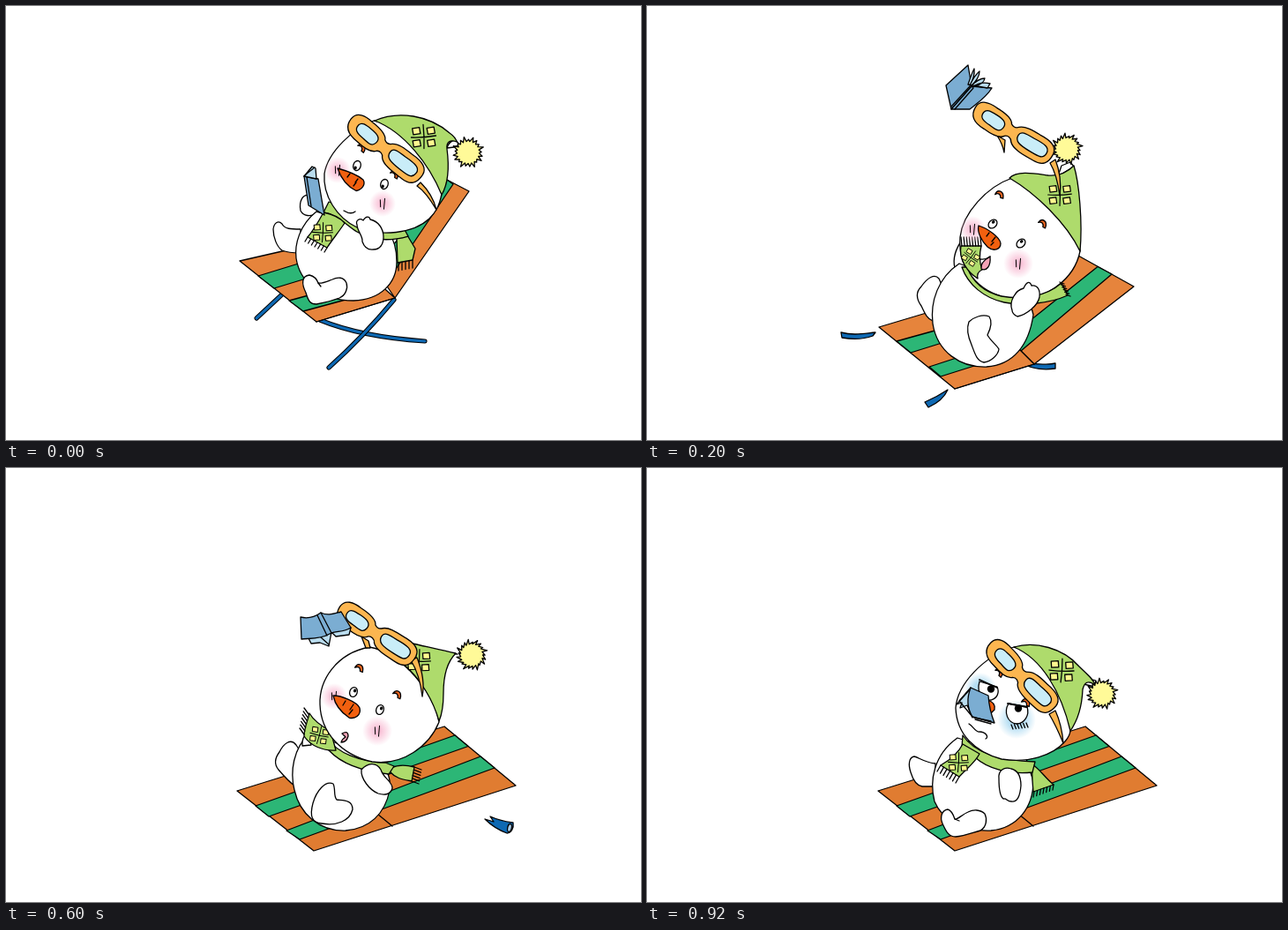
These frames come from a looping animation (720x492 px, 1 s). An HTML page:

```html
<!DOCTYPE html>
<html lang="en">
<head>
<meta charset="utf-8">
<title>Snowman on a deck chair</title>
<style>
html, body { margin: 0; width: 100%; height: 100%; overflow: hidden; background: #fff; }
svg { display: block; width: 100vw; height: 100vh; }
svg > g { opacity: 0; }
</style>
</head>
<body>
<svg id="stage" viewBox="0 0 720 492" fill="none" stroke="#000" stroke-width="1.3" stroke-linejoin="round" stroke-linecap="round">
<defs>
<radialGradient id="pink"><stop offset=".15" stop-color="#f8bdd4"/><stop offset="1" stop-color="#f8bdd4" stop-opacity="0"/></radialGradient>
<radialGradient id="chill"><stop offset=".4" stop-color="#b5def3"/><stop offset="1" stop-color="#b5def3" stop-opacity="0"/></radialGradient>
</defs>
</svg>
<script>
const C = {
  snow: '#fff', wool: '#aedb6c', orange: '#e6843c', mat: '#e07c31', green: '#2cb676',
  steel: '#0e69b3', tip: '#a9cdea', book: '#7badd2', page: '#b9dcee', frame: '#fcb650',
  lens: '#c9edf8', carrot: '#f2600f', brow: '#e8641e', puff: '#fffa98', patch: '#fff98f', tongue: '#f3a3b6'
};

const P = (d, fill = 'none', extra = '') => `<path d="${d}" fill="${fill}" ${extra}/>`;
const snow = (...ds) => ds.map(d => P(d, C.snow)).join('');
const wool = (...ds) => ds.map(d => P(d, C.wool)).join('');
const at = (x, y, turn, inner, size = 1) =>
  `<g transform="translate(${x} ${y}) rotate(${turn}) scale(${size})">${inner}</g>`;
const glow = (x, y, r, id) => `<circle cx="${x}" cy="${y}" r="${r}" fill="url(#${id})" stroke="none"/>`;

function puff(x, y, turn, lean = 0) {
  const n = 21;
  let d = '';
  for (let i = 0; i < n; i++) {
    const a = i / n * 2 * Math.PI, b = (i + .5) / n * 2 * Math.PI;
    const r = 16.5 + 1.8 * Math.sin(i * 2.4);
    d += `${i ? 'L' : 'M'}${12.5 * Math.cos(a)},${12.5 * Math.sin(a)}L${r * Math.cos(b + lean)},${r * Math.sin(b + lean)}`;
  }
  return at(x, y, turn, P(d + 'Z', C.puff));
}

function plaid(x, y, turn = 0, size = 1) {
  const square = (a, b) => P(`M${a},${b}l8,-1l1,7l-8,1Z`, C.patch);
  return at(x, y, turn, P('M-14,0Q0,1 14,-1M0,-14Q1,0 0,13') +
    square(-12.5, -10) + square(4, -10) + square(-12.5, 4) + square(4, 4), size);
}

// Tassel threads between two points, all leaning by (dx, dy).
function fringe(x0, y0, x1, y1, dx, dy, n = 7) {
  let d = '';
  for (let i = 0; i < n; i++) {
    const k = i / (n - 1);
    d += `M${x0 + (x1 - x0) * k},${y0 + (y1 - y0) * k}l${dx},${dy}`;
  }
  return P(d);
}

const goggles = (x, y, turn) => at(x, y, turn,
  P('M-51,-4C-51,-15 -40,-17 -30,-16C-20,-16 -9,-15 -6,-9C-3,-7 0,-7 3,-10C8,-15 18,-15 28,-15C42,-16 51,-13 52,-4C53,8 48,14 36,14C24,14 10,15 4,9C2,5 -3,4 -6,7C-10,13 -20,13 -30,12C-42,12 -51,8 -51,-4Z', C.frame) +
  P('M-40,-4C-39,-9 -34,-9 -26,-9C-15,-9 -11,-6 -12,0C-13,6 -17,6 -26,5C-36,5 -41,3 -40,-4Z', C.lens) +
  P('M7,-2C7,-8 13,-8 24,-8C38,-9 45,-8 45,-1C45,7 40,7 28,7C14,7 7,6 7,-2Z', C.lens));

const eye = (x, y, turn, px = 0, py = 3) => at(x, y, turn,
  `<ellipse rx="4.2" ry="5.6" fill="#fff"/><ellipse cx="${px}" cy="${py}" rx="1.7" ry="2" fill="#000" stroke="none"/>`);

const blush = (x, y, r = 15, turn = 5) => glow(x, y, r, 'pink') +
  at(x, y, turn, P('M-3,-4L-2,4M2,-6L2,6', 'none', 'stroke-width="1"'));

const brow = (x, y, turn) => at(x, y, turn, P('M-5,2C-4,-5 4,-5 5,4L2,4C1,0 -2,-1 -5,2Z', C.brow));

const nose = (d, marks) => P(d, C.carrot) + P(marks);

const bar = d => P(d, 'none', 'stroke-width="5.2"') + P(d, 'none', `stroke="${C.steel}" stroke-width="3.2"`);
const scrap = d => P(d, C.steel);
const stub = (x, y, turn) => at(x, y, turn, `<ellipse rx="2.3" ry="4.6" fill="${C.tip}"/>`);

function mat() {
  return P('M262,366L497,293L578,360L349,434Z', C.mat) +
    P('M283,383L509,303L524,315.5L298,395Z', C.green) +
    P('M318,411L538,327L554,340L333,421Z', C.green) +
    P('M421,392L438,406');
}

const lounging = () =>
  bar('M313,327L284,354') + bar('M356,356Q402,375 475,380') + bar('M440,333Q406,374 366,410') +
  P('M441,331L525,210L500,197L420,300Z', C.orange) +
  P('M507,202L428,319L415,300L500,197Z', C.green) +
  P('M265,289L335,273L412,305L441,331L352,358Z', C.orange) +
  P('M286,306L335,291L350,306L304,320Z', C.green) +
  P('M321,334L365,322L385,333L337,346Z', C.green) +
  P('M352,358L441,331') +
  snow('M334,253C323,253 316,253 313,247C309,243 304,245 303,253C303,262 307,273 313,277C320,280 326,280 334,280Z',
    'M345,215C336,212 332,222 334,232C337,238 345,240 354,234Z',
    'M352,233C333,248 327,270 329,286C333,312 356,334 394,334C425,333 443,314 443,290C443,275 440,265 434,256Z',
    'M344,305C335,306 335,315 340,325C343,335 345,338 352,338C362,336 370,334 378,331C385,328 388,320 386,314C383,307 376,307 370,310C362,313 358,315 354,314C352,308 348,306 344,305Z') +
  P('M354,314L357,318') +
  wool('M443,263L455,260L464,275L461,288L444,291Z',
    'M366,222L360,234C376,236 385,248 398,256C415,266 435,267 456,261L450,250Z',
    'M360,234C354,245 348,255 342,262L364,274C370,265 378,255 384,246C378,239 370,236 360,234Z') +
  fringe(342, 262, 364, 274, -3, 5) + fringe(445, 291, 461, 288, 0, 9, 5) + plaid(359, 257, 3, .82) +
  P('M338,193L354,196L361,237L343,226Z', C.book) + P('M338,193L347,182L351,184L352,196Z', C.page) +
  P('M338,193L341,190L350,183M341,194L346,227') +
  snow('M417,130C395,138 365,165 361,190C359,215 375,240 398,251C425,262 462,258 480,241C487,234 491,228 494,213C490,175 460,138 417,130Z') +
  snow('M500,161Q503,152 510,152L514,157L508,160Z') +
  wool('M418,130C445,118 480,124 503,144Q510,149 511,154C504,151 499,154 500,162C503,185 501,202 494,214C480,180 452,143 418,130Z') +
  puff(524, 166, 4, .04) + plaid(473.5, 148.5, -2) +
  blush(376, 186) + blush(427, 224) + eye(398, 181, 18, -1, 3) + eye(429, 202, 18, -1, 3) +
  nose('M376,184C387,187 398,191 405,197C408,202 404,208 397,209.5C388,205 380,196 376,184Z', 'M390,190L387,194M399,196L396,200M394,204L397,200') +
  P('M383,232Q391,237 396,233') + brow(404, 160, 40) + brow(441, 190, 30) +
  P('M470,200C478,208 485,218 488,231C481,219 475,210 466,204Z', C.frame) + goggles(429, 162.5, 38) +
  snow('M398,248C396,243 401,240 405,243C408,238 412,238 413,242C422,244 428,252 428,262C428,270 424,276 417,276C410,277 406,273 404,267C405,261 398,255 398,248Z');

const falling = () =>
  scrap('M220,370C235,374 247,371 259,370L256,374C245,378 232,378 221,376Z') +
  scrap('M315,449L319,455C330,450 338,442 341,435C332,441 322,446 315,449Z') +
  scrap('M428,406C440,404 452,408 463,405L463,411C450,413 438,411 432,408Z') +
  P('M439,406L552,318L489,283L400,350L424,391Z', C.orange) +
  P('M511,295.5L527,304L424,391L410,376Z', C.green) +
  P('M263,364L330,344L424,391L439,406L349,434Z', C.orange) +
  P('M283,380L330,367L360,374L299,393Z', C.green) +
  P('M320,409L360,396L390,402L333,420Z', C.green) +
  P('M349,434L439,406') +
  snow('M331,309C326,303 318,308 311,318C304,325 306,333 311,340C315,348 317,354 324,357L336,320Z',
    'M358,264C350,275 346,285 349,297L365,300Z',
    'M354,292C330,308 321,335 324,360C329,392 355,410 385,409C415,407 433,385 438,350L430,320Z',
    'M365,358C362,366 364,375 368,384C372,395 374,402 382,404C390,403 398,396 399,389C397,385 390,380 386,373C390,365 392,358 388,352C380,349 370,353 365,358Z') +
  snow('M414,195C385,205 358,235 355,262C352,300 380,330 420,332C455,333 485,308 491,278C488,240 455,202 414,195Z') +
  wool('M363,296C370,315 385,325 402,329C425,333 452,330 470,314L477,328C455,338 425,340 405,336C382,331 364,316 357,296Z',
    'M356,272L379,272C376,284 377,291 380,299C375,301 374,304 375,309C364,302 353,288 356,272Z') +
  fringe(357, 272, 379, 272, -1, -10, 8) + fringe(468, 313, 475, 327, 5, 2, 6) + plaid(367, 285, 38, .65) +
  snow('M466,193L470,181L480,177L484,182Z') +
  wool('M411,195C420,186 440,190 455,192C466,193 475,190 484,181C490,200 494,245 491,278C475,245 440,212 411,195Z') +
  puff(476, 162, 8, .12) + plaid(468, 214, 0, .95) +
  blush(369, 253) + blush(421, 292, 17) + eye(392, 247, 45, -1, -2) + eye(424, 269, 45, -1, -2) +
  nose('M376,249C386,252 400,262 401,269C401,276 393,279 386,273C380,267 374,257 376,249Z', 'M388,257L385,261M395,262L391,267M390,271L393,268') +
  P('M389,284C390,295 385,301 379,298C378,293 382,288 389,284Z', C.tongue) + P('M378,287Q384,288 389,284') +
  brow(400, 213, 15) + brow(449, 246, 28) +
  P('M397,147L406,152L405,166Q403,156 397,147Z', C.frame) +
  P('M457,178L463,174C468,187 470,200 468,215C466,200 463,188 457,178Z', C.frame) + goggles(414, 144.5, 31) +
  P('M339,90L364,67L368,91L345,117Z', C.book) + P('M368,91L391,93C385,103 376,109 366,117L345,117Z', C.book) +
  P('M364,89Q368,77 371,71Q372,80 366,90Q371,79 377,74Q377,82 367,91Q376,82 383,82Q382,89 369,92Q378,85 389,88L386,93Z', C.page) +
  P('M349,117L370,93M345,114L366,91') +
  snow('M414,345C410,335 418,322 427,320C430,313 434,311 436,317C443,316 446,322 445,330C443,340 430,350 420,352C416,350 414,348 414,345Z');

const landing = () =>
  scrap('M183,351L188,346C198,355 206,363 217,367L214,370C202,368 190,362 183,353Z') + stub(186, 350, 35) +
  scrap('M285,473C289,466 300,461 313,457C310,464 302,474 293,478Z') + stub(290, 474, 110) +
  scrap('M498,395L507,391C511,400 512,410 508,419Q506,412 505,411L504,413Q502,401 498,397Z') + stub(503, 394, 70) +
  mat() +
  snow('M341,308C335,306 325,306 317,307C310,309 307,314 308,322C309,335 312,345 317,352L342,325Z',
    'M349,287C342,295 340,305 343,314L360,312Z',
    'M350,309C325,318 312,340 316,363C321,393 350,412 385,411C420,410 443,392 443,365C442,350 435,345 430,340Z',
    'M373,366C368,372 370,385 374,395C377,401 376,404 380,404C388,404 396,400 402,393C399,387 395,383 390,378C394,372 400,368 401,360C396,354 380,357 373,366Z') +
  snow('M406,214C375,225 350,248 348,272C345,310 370,340 405,345C442,349 475,327 484,297C480,252 450,218 406,214Z') +
  wool('M437,349C448,346 455,339 463,331L466,344C455,350 445,350 436,356Z',
    'M366,306C373,325 392,344 412,346L440,346L438,353L411,354C384,352 359,335 352,310Z',
    'M347,287L369,286C366,297 367,303 372,310L362,322C350,312 346,298 347,287Z') +
  fringe(347, 287, 369, 286, -2, -10) + fringe(459, 333, 464, 343, 9, 0, 5) + plaid(358, 301, 45, .65) +
  P('M476,206L482,195') +
  wool('M406,213C425,205 445,211 460,212C470,212 475,205 480,201C487,205 487,225 488,250C489,270 487,285 484,297C470,262 440,230 406,213Z') +
  puff(492, 186, 0, .16) + plaid(463, 233, 3, .97) +
  blush(364, 269, 14) + blush(415, 308, 17) +
  P('M380,260Q390,263 391,273M384,259Q390,260 393,269M407,290Q413,285 423,294M411,286Q417,284 421,290') +
  nose('M376,263C381,257 388,265 391,273C395,281 395,290 388,293C381,292 375,277 376,263Z', 'M388,270L383,273M392,280L386,281M383,287L388,285L386,280') +
  P('M371,308Q380,312 384,316Q391,322 390,317Q388,313 382,314', C.tongue) +
  P('M387,240Q394,244 394,253L390,252Z', C.brow) + P('M424,276Q430,271 438,276Q430,278 424,276Z', C.brow) +
  P('M396,148L405,152L405,165Q402,156 396,148Z', C.frame) +
  P('M457,178L463,174C468,187 470,200 468,214C466,200 463,188 457,178Z', C.frame) + goggles(415, 145, 31) +
  P('M350,86Q352,78 359,78Q368,84 370,101Q365,84 364,79Q373,84 371,100L375,84Q378,90 372,101L384,91Q381,98 371,104Z', C.page) +
  P('M324,110L343,82C356,84 364,94 371,103L346,122C338,116 330,112 324,110Z', C.book) + P('M371,103L385,90M366,98L371,103') +
  snow('M409,356C408,342 410,328 417,325C420,323 422,326 423,328C427,322 434,324 435,331C437,343 436,357 430,363C422,366 411,363 409,356Z');

const dazed = () =>
  scrap('M543,398L553,401L549,395C560,400 568,401 575,402C576,408 573,414 568,414C560,411 550,405 543,398Z') + stub(571, 408, 12) +
  mat() +
  snow('M329,314C323,306 315,312 310,322C304,330 304,336 309,342C315,349 320,355 327,360L336,325Z',
    'M345,300C325,318 322,345 327,365C333,392 355,412 385,411C412,409 430,392 435,365C437,350 430,338 420,330Z',
    'M371,358C362,354 352,366 348,380C344,395 347,402 358,403C375,406 390,400 393,387C393,376 382,377 375,376C371,372 374,364 371,358Z',
    'M342,300Q335,305 336,315L346,314Z') +
  wool('M437,340C445,336 455,337 463,339L460,355C450,353 442,352 436,345Z',
    'M366,308C375,322 400,333 430,334L440,338L434,347C405,344 380,335 366,320Z',
    'M344,278C350,288 360,294 368,298L374,320C360,321 345,315 338,304C338,295 342,287 344,278Z') +
  fringe(343, 279, 338, 302, -5, -7) + fringe(463, 339, 460, 355, 8, 3, 6) + plaid(355, 303, 15, .75) +
  snow('M412,203C375,210 355,240 356,268C357,300 380,325 415,333C450,338 480,315 491,288C485,255 450,210 412,203Z') +
  P('M502,210L512,211') +
  wool('M457,198C475,202 495,207 510,210C500,220 496,235 496,255C496,270 494,280 491,287C485,265 470,238 450,222Z') +
  puff(528, 212, 0, .16) + plaid(468, 219, 4, .95) +
  blush(372, 259) + blush(421, 298, 17) + eye(394, 254, 20, 1, -2) + eye(424, 274, 20, 1, -2) +
  nose('M371,258C380,258 398,265 401,272C403,280 396,285 389,283C380,277 373,268 371,258Z', 'M385,264L382,269M394,268L390,274M389,279L393,274') +
  P('M381,301Q388,297 388,304Q386,311 380,311Q381,307 385,305Z', C.tongue) +
  brow(401, 226, 20) + brow(444, 256, 25) +
  P('M403,191L411,196L413,204L408,204Z', C.frame) +
  P('M459,218L466,215C472,230 475,244 472,259C470,242 466,229 459,218Z', C.frame) + goggles(419, 188.5, 33) +
  P('M342,191L346,199L356,198L366,202L369,186L374,191L389,189L391,181Z', C.page) + P('M357,192L366,200') +
  P('M334,169C342,171 350,169 357,164C365,168 372,165 380,163L391,181C382,187 374,184 367,188C357,194 345,193 335,194Z', C.book) +
  P('M353,167L364,190M357,164L369,187') +
  snow('M403,342C410,334 420,333 425,342C428,352 438,355 438,363C436,371 428,371 422,369C412,365 402,352 403,342Z');

const grumpy = () =>
  mat() +
  snow('M327,335C315,334 308,328 303,327C297,328 296,336 299,345C302,355 306,360 312,361L327,361Z',
    'M352,306C325,325 320,355 326,378C335,400 360,412 390,411C420,408 438,385 438,355L430,330Z',
    'M341,387C334,388 332,396 335,403C339,412 342,418 350,418C360,417 370,413 378,411C385,407 386,398 383,392C378,387 370,387 364,390C357,393 352,399 349,398C347,392 345,388 341,387Z') +
  P('M349,398L354,400') +
  wool('M437,336C446,342 452,352 461,359L438,367C437,355 436,348 437,336Z',
    'M358,303C368,318 390,332 440,333L437,345C410,348 385,340 372,328L357,316Z',
    'M358,313C352,325 340,333 333,337L354,350C363,340 372,334 377,324Z') +
  fringe(333, 337, 354, 350, -4, 7) + fringe(439, 367, 461, 359, -1, 6) + plaid(353, 334, 3, .82) +
  snow('M416,203C382,213 352,245 350,272C351,302 372,322 402,330C432,335 460,326 474,310Q480,303 480,297C482,250 455,208 416,203Z') +
  snow('M495,245Q501,238 509,241L508,248Z') +
  wool('M416,203C440,196 472,204 490,225C500,235 507,240 508,246C500,240 496,243 494,251C493,275 487,288 480,298C470,255 448,216 416,203Z') +
  puff(516, 256, 6, .1) + plaid(470, 230, 4) +
  glow(378, 250, 18, 'chill') + glow(419, 285, 22, 'chill') +
  snow('M377,242C373,256 382,264 390,263C397,261 400,255 397,248Z', 'M410,267C404,277 409,289 419,290C428,290 434,280 431,271Z') +
  P('M377,240L397,249M409,267L431,271', 'none', 'stroke-width="1.8"') +
  `<g fill="#000" stroke="none"><circle cx="390" cy="250.5" r="4.2"/><circle cx="421" cy="272.5" r="4.2"/></g>` +
  fringe(413, 291, 430, 289, 2, 5, 6) +
  P('M386,263Q396,266 394,274L389,279Z', C.carrot) +
  P('M367,250L351,268L357,266L355,272L363,269L369,283L366,262Z', C.page) +
  P('M367,249L387,258Q388,274 394,289L369,282C364,274 362,262 367,249Z', C.book) +
  P('M367,249L354,264L369,282M372,285L390,290M371,283L390,287') +
  P('M365,290C370,293 373,300 377,299C384,299 388,305 384,307') +
  brow(400, 231, 40) + brow(430, 265, 20) +
  P('M456,279L463,275C468,286 471,299 472,312C467,300 462,289 456,279Z', C.frame) + goggles(423.5, 236.5, 44) +
  snow('M399,352C398,343 405,338 413,341C421,343 424,350 424,360C423,372 420,379 413,378C408,378 408,374 404,375C400,372 399,360 399,352Z');

const poses = [lounging, falling, landing, dazed, grumpy];
const stage = document.getElementById('stage');
stage.insertAdjacentHTML('beforeend', poses.map(pose => `<g>${pose()}</g>`).join(''));

// Each pose holds for an equal share of the loop, with hard cuts.
const loop = 1000, easing = 'steps(1, end)';
stage.querySelectorAll(':scope > g').forEach((g, i) => {
  const from = i / poses.length, to = (i + 1) / poses.length;
  const keys = [{ opacity: 1, offset: from, easing }, { opacity: 0, offset: to, easing }];
  if (from > 0) keys.unshift({ opacity: 0, offset: 0, easing });
  if (to < 1) keys.push({ opacity: 0, offset: 1 });
  g.animate(keys, { duration: loop, iterations: Infinity });
});
</script>
</body>
</html>
```
